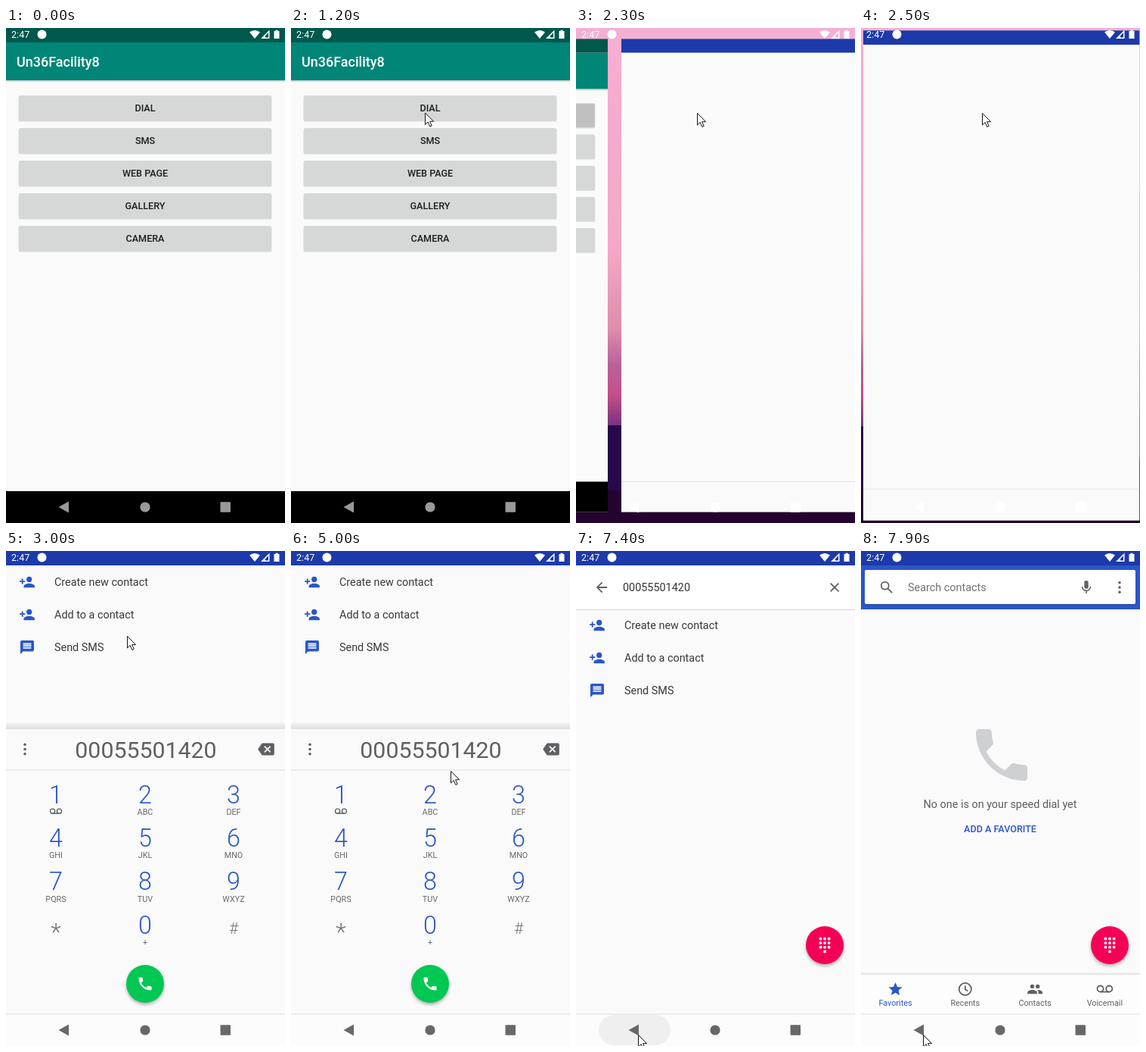
An HTML page for the animation above (8 s loop, 369x653 px).

```html
<!DOCTYPE html>
<html lang="en">
<head>
<meta charset="utf-8">
<title>Phone intent demo</title>
<style>
html, body { margin: 0; width: 100%; height: 100%; overflow: hidden; background: #fafafa; }
svg { display: block; width: 100%; height: 100%; font-family: Roboto, sans-serif; }
</style>
</head>
<body>
<svg id="stage" viewBox="0 0 369 653"></svg>
<script>
const DURATION = 8000, STEP = 100;
const BLUE = '#2a56c6', DEEP_BLUE = '#1c3aa9', GREY = '#5f6063', PAPER = '#fafafa';
const PHONE = '00055501420';

const ICONS = {
  call: '<path d="M6.62 10.79c1.44 2.83 3.76 5.14 6.59 6.59l2.2-2.2c.27-.27.67-.36 1.02-.24 1.12.37 2.33.57 3.57.57.55 0 1 .45 1 1V20c0 .55-.45 1-1 1C10.61 21 3 13.39 3 4c0-.55.45-1 1-1h3.5c.55 0 1 .45 1 1 0 1.25.2 2.45.57 3.57.11.35.03.74-.25 1.02z"/>',
  addPerson: '<circle cx="15" cy="8" r="4"/><path d="M15 14c-2.67 0-8 1.34-8 4v2h16v-2c0-2.66-5.33-4-8-4zM6 10V7H4v3H1v2h3v3h2v-3h3v-2z"/>',
  message: '<path fill-rule="evenodd" d="M20 2H4Q2 2 2 4V22l4-4h14q2 0 2-2V4q0-2-2-2zM18 14H6v-2h12zM18 11H6V9h12zM18 8H6V6h12z"/>',
  erase: '<path fill-rule="evenodd" d="M22 3H7q-1 0-1.6.9L0 12l5.4 8.1Q6 21 7 21h15q2 0 2-2V5q0-2-2-2zM19 15.6 17.6 17 14 13.4 10.4 17 9 15.6 12.6 12 9 8.4 10.4 7 14 10.6 17.6 7 19 8.4 15.4 12z"/>',
  voicemail: '<g fill="none" stroke="currentColor" stroke-width="2"><circle cx="5.5" cy="11.5" r="4.5"/><circle cx="18.5" cy="11.5" r="4.5"/><path d="M5.5 16h13"/></g>',
  search: '<g fill="none" stroke="currentColor" stroke-width="2"><circle cx="9.5" cy="9.5" r="5.5"/><path d="M13.8 13.8 20 20"/></g>',
  mic: '<rect x="9" y="2" width="6" height="12" rx="3"/><path d="M6 11a6 6 0 0 0 12 0M12 17v4" fill="none" stroke="currentColor" stroke-width="1.8"/>',
  more: '<circle cx="12" cy="5" r="2"/><circle cx="12" cy="12" r="2"/><circle cx="12" cy="19" r="2"/>',
  back: '<path d="M20 11H7.8l5.6-5.6L12 4l-8 8 8 8 1.4-1.4L7.8 13H20z"/>',
  close: '<path d="M6 6 18 18M18 6 6 18" fill="none" stroke="currentColor" stroke-width="2"/>',
  star: '<path d="M12 17.27 18.18 21l-1.64-7.03L22 9.24l-7.19-.61L12 2 9.19 8.63 2 9.24l5.46 4.73L5.82 21z"/>',
  clock: '<g fill="none" stroke="currentColor" stroke-width="2"><circle cx="12" cy="12" r="9"/><path d="M12 7v5.4l4 2.4"/></g>',
  people: '<circle cx="8" cy="8" r="3"/><circle cx="16" cy="8" r="3"/><path d="M8 13c-2.33 0-7 1.17-7 3.5V19h14v-2.5C15 14.17 10.33 13 8 13zM16 13l-1 .05c1.2.84 2 1.97 2 3.45V19h6v-2.5c0-2.33-4.67-3.5-7-3.5z"/>'
};

const icon = (name, x, y, scale = .9, color = GREY) =>
  `<g transform="translate(${x} ${y}) scale(${scale}) translate(-12 -12)" fill="${color}" color="${color}">${ICONS[name]}</g>`;
const text = (s, x, y, size, color, more = '') =>
  `<text x="${x}" y="${y}" font-size="${size}" fill="${color}" ${more}>${s}</text>`;
const mid = (s, x, y, size, color, weight = 400) =>
  text(s, x, y, size, color, `text-anchor="middle" font-weight="${weight}"`);
const rect = (x, y, w, h, fill, more = '') =>
  `<rect x="${x}" y="${y}" width="${w}" height="${h}" fill="${fill}" ${more}/>`;
const group = (id, body, more = '') => `<g id="${id}" ${more}>${body}</g>`;

const menu = () => rect(0, 0, 369, 653, PAPER) +
  rect(0, 69, 369, 3, 'url(#drop)') + rect(0, 19, 369, 50, '#008577') + rect(0, 0, 369, 19, '#00574b') +
  text('Un36Facility8', 14, 51, 18, '#fff', 'font-weight="500"') +
  ['DIAL', 'SMS', 'WEB PAGE', 'GALLERY', 'CAMERA'].map((label, i) => {
    const y = 89 + i * 43;
    return rect(16.5, y + 1, 335, 33.5, '#000', 'rx="2" opacity=".13"') +
      rect(17, y, 334, 33, '#d6d7d7', `rx="2" id="button${i}"`) +
      mid(label, 184, y + 21, 12.6, '#1d1d1d', 500);
  }).join('') + rect(0, 611, 369, 42, '#000');

const blank = () => rect(0, 0, 369, 653, PAPER) + rect(0, 0, 369, 19, DEEP_BLUE) + rect(0, 610.5, 369, 1, '#e2e2e2');

const contactList = () => [['addPerson', 'Create new contact'], ['addPerson', 'Add to a contact'], ['message', 'Send SMS']]
  .map(([name, label], i) => icon(name, 28, 41 + i * 43, .9, BLUE) + text(label, 64, 46 + i * 43, 14.4, '#3a3a3a')).join('');

const keys = () => ['', 'ABC', 'DEF', 'GHI', 'JKL', 'MNO', 'PQRS', 'TUV', 'WXYZ', '', '+', ''].map((letters, i) => {
  const x = [66, 184, 301][i % 3], y = 332.5 + Math.floor(i / 3) * 57.4;
  if (i === 9) return mid('*', x, 513, 32, '#757575', 300);
  if (i === 11) return mid('#', x, 504.5, 21, '#757575', 300);
  return mid(i === 10 ? 0 : i + 1, x, y, 32.3, BLUE, 300) + mid(letters, x, y + 15.5, 10.8, '#68696c');
}).join('') + icon('voicemail', 66, 343.5, .68);

const dialpad = () => rect(0, 226, 369, 9, 'url(#rise)') + rect(0, 235, 369, 440, PAPER) +
  icon('more', 25, 261.5) + mid(PHONE, 185, 273, 30.3, GREY) + icon('erase', 344, 261.5) +
  rect(0, 288.5, 369, 1, '#e4e4e4') + keys();

const fab = (color, content) =>
  `<circle cy="2.5" r="25" opacity=".3" filter="url(#soft)"/><circle r="25" fill="${color}"/>` + content;
const keypadDots = () => Array.from({ length: 10 }, (_, i) => {
  const x = i < 9 ? (i % 3 - 1) * 5.6 : 0, y = Math.floor(i / 3) * 5.6 - 8.5 + (i === 9 ? 0.2 : 0);
  return `<circle cx="${x}" cy="${y}" r="1.9" fill="#fff"/>`;
}).join('');

const favorites = () => icon('call', 186, 269, 3.78, '#cfd0d3') +
  mid('No one is on your speed dial yet', 184, 339, 14.4, '#5c5d60') +
  mid('ADD A FAVORITE', 184, 371, 12.6, BLUE, 500) +
  rect(0, 556, 369, 3, 'url(#rise)') + rect(0, 559, 369, 52, '#fdfdfd') +
  [['star', 'Favorites'], ['clock', 'Recents'], ['people', 'Contacts'], ['voicemail', 'Voicemail']].map(([name, label], i) => {
    const x = 45.5 + i * 92.3, color = i ? GREY : BLUE;
    return icon(name, x, 578, .9, color) + mid(label, x, 600, 10.8, color);
  }).join('');

const toolbar = () => group('band', rect(0, 19, 369, 58, BLUE)) +
  rect(0, 20, 369, 58, '#000', 'id="cardShade" opacity=".16"') + rect(0, 19, 369, 58, '#fff', 'id="card"') +
  group('query', icon('back', 34, 48) + text(PHONE, 62, 53, 14.4, '#333') + icon('close', 342, 48)) +
  group('hint', icon('search', 34, 48) + text('Search contacts', 62, 53, 14.4, '#707173') + icon('mic', 298, 48) + icon('more', 342, 48));

const statusIcons = () => text('2:47', 7, 13, 12.6, '#fff') + '<circle cx="47.5" cy="8.5" r="6" fill="#fff"/>' +
  '<path fill="#fff" d="M322 5.5q7-5 14 0l-7 8.5zM354.5 4h2V2.7h3V4h2v10h-7z"/>' +
  '<path fill="#fff" fill-rule="evenodd" d="M337 14 348.5 2.5V14zM343 12.6h4V6.3l-4 4z"/>';

const stop = (offset, color, opacity = 1) => `<stop offset="${offset}" stop-color="${color}" stop-opacity="${opacity}"/>`;
const gradient = (id, stops) => `<linearGradient id="${id}" x2="0" y2="1">${stops}</linearGradient>`;

document.getElementById('stage').innerHTML = '<defs>' +
  gradient('drop', stop(0, '#000', .2) + stop(1, '#000', 0)) +
  gradient('rise', stop(0, '#000', .02) + stop(1, '#000', .11)) +
  gradient('sky', stop(0, '#f6aed2') + stop(.45, '#f3a8c8') + stop(.61, '#de8cab') + stop(.68, '#b8629a') +
    stop(.74, '#c44f88') + stop(.8, '#7c3580')) +
  '<filter id="soft" x="-30%" y="-30%" width="160%" height="160%"><feGaussianBlur stdDeviation="2.2"/></filter></defs>' +
  group('wallpaper', rect(0, 0, 369, 653, 'url(#sky)') + '<ellipse cx="62" cy="660" rx="420" ry="136" fill="#27084a"/>' +
    rect(0, 610, 369, 43, '#22042f')) +
  group('menu', menu()) + group('blank', blank()) +
  group('dialer', rect(0, 0, 369, 653, PAPER) + group('favorites', favorites()) + group('list', contactList()) +
    group('toolbar', toolbar()) + group('pad', dialpad()) +
    group('callFab', fab('#00c853', icon('call', 0, 0, .95, '#fff'))) + group('padFab', fab('#f50057', keypadDots())) +
    rect(0, 0, 369, 19, DEEP_BLUE) + rect(0, 611, 369, 42, '#fcfcfc') + rect(0, 610.5, 369, 1, '#e2e2e2') +
    rect(30, 612, 95, 40, '#ededed', 'rx="20" id="ripple"')) +
  statusIcons() +
  group('navIcons', '<path d="M69.5 632 83 624.5v15z"/><circle cx="184" cy="632" r="6.6"/><rect x="283.5" y="625.3" width="13.5" height="13.5" rx="1"/>') +
  group('cursor', '<path d="M.5.5V16l3.7-3.5 2.6 6 2.4-1-2.6-5.8h5z" fill="#fff" stroke="#14141c"/>');

// Tables hold [time, ...values]; "held" keeps the latest row, "eased" blends between rows.
const PRESS = [[0, '#d6d7d7'], [1900, '#cecece'], [2000, '#c5c5c5'], [2100, '#c0c0c0']];
const SLIDE = [[0, 1, 387], [2200, .975, 290], [2300, .956, 60], [2400, .965, 14], [2500, .99, 3], [2600, 1, 0]];
const PAD_Y = [[0, 385], [2800, 190], [2900, 45], [3000, 0], [6400, 14], [6500, 65.5], [6600, 220], [6700, 385]];
const CALL_SIZE = [[0, 0], [2900, .6], [3000, 1], [6400, .5], [6500, 0]];
const PAD_FAB_SIZE = [[0, 0], [6600, .5], [6700, 1]];
const TOOLBAR_Y = [[0, -60], [6400, -52], [6500, -36], [6600, -12], [6700, 0]];
const LIST_Y = [[0, 0], [6400, 5], [6500, 21], [6600, 45], [6700, 57]];
const RIPPLE = [[0, 0], [6300, .7], [6400, 1], [6600, .6], [6700, 0], [7400, .8], [7500, 1], [7600, .5], [7700, 0]];
const COLLAPSE = [[0, 0], [7500, .35], [7600, .75], [7700, 1]];
const CURSOR = [
  [500, 344, 66], [700, 300, 84], [900, 240, 100], [1100, 190, 110], [1300, 164, 113], [1400, 160, 112],
  [3100, 160, 112], [3200, 164, 118], [3400, 190, 180], [3600, 214, 260], [3700, 212, 288], [3800, 180, 296],
  [3900, 140, 285], [4000, 118, 262], [4100, 124, 238], [4200, 160, 231], [4300, 215, 234], [4400, 246, 248],
  [4500, 236, 274], [4600, 211, 283], [4900, 211, 283], [5000, 211, 290], [5200, 190, 360], [5400, 150, 470],
  [5600, 105, 580], [5800, 82, 638], [8000, 82, 638]
];

const held = (table, t) => table.filter(row => row[0] <= t).pop().slice(1);
const lerp = (a, b, k) => a + (b - a) * k;
function eased(table, t) {
  const i = Math.max(1, table.findIndex(row => row[0] > t));
  const a = table[i - 1], b = table[i], k = (t - a[0]) / (b[0] - a[0]);
  return [lerp(a[1], b[1], k), lerp(a[2], b[2], k)];
}

const el = id => document.getElementById(id);
const set = (id, attrs) => { for (const key in attrs) el(id).setAttribute(key, attrs[key]); };
const show = (id, visible) => set(id, { visibility: visible ? 'visible' : 'hidden' });
const move = (id, x, y, scale = 1) => set(id, { transform: `translate(${x} ${y}) scale(${scale})` });

function render(t) {
  const sliding = t >= 2200 && t < 2600;
  const [scale, x] = held(SLIDE, t), top = (1 - scale) * 326.5;
  show('wallpaper', sliding);
  show('menu', t < 2600);
  show('blank', t >= 2200 && t < 2700);
  set('dialer', { display: t >= 2700 ? 'inline' : 'none' });
  move('menu', x - 18 - 369 * scale, top, scale);
  move('blank', x, top, scale);
  set('button0', { fill: held(PRESS, t)[0] });
  set('navIcons', { fill: t < 2200 ? '#999' : t < 2700 ? '#fff' : '#686868' });

  move('pad', 0, held(PAD_Y, t)[0]);
  move('callFab', 184, 571, held(CALL_SIZE, t)[0]);
  move('padFab', 329, 520, held(PAD_FAB_SIZE, t)[0]);
  move('list', 0, held(LIST_Y, t)[0]);
  move('toolbar', 0, held(TOOLBAR_Y, t)[0]);
  set('ripple', { opacity: held(RIPPLE, t)[0] });

  const k = held(COLLAPSE, t)[0];
  const box = { x: 5 * k, width: lerp(369, 358, k), height: lerp(58, 45, k), rx: 2 * k };
  set('card', { ...box, y: 19 + 6 * k });
  set('cardShade', { ...box, y: 20 + 6 * k });
  set('band', { opacity: k > 0 ? 1 : 0 });
  for (const id of ['query', 'list']) set(id, { opacity: 1 - k });
  for (const id of ['hint', 'favorites']) set(id, { opacity: k });

  show('cursor', t >= 500);
  if (t >= 500) move('cursor', ...eased(CURSOR, t));
}

const start = performance.now();
function tick() {
  const t = (performance.now() - start) % DURATION;
  render(Math.floor(t / STEP) * STEP);
  requestAnimationFrame(tick);
}
tick();
</script>
</body>
</html>
```
